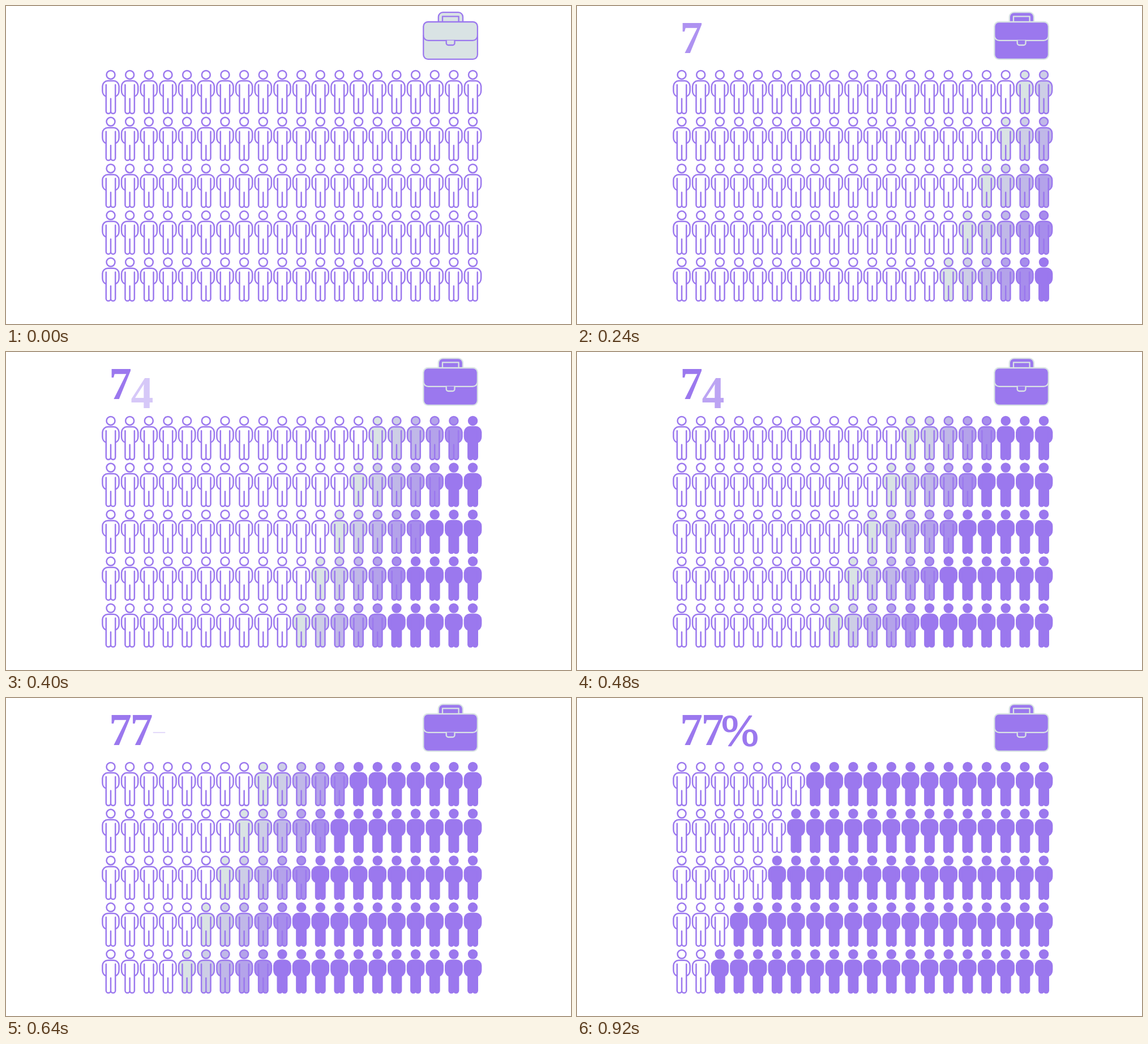
An HTML page that plays this animation: 998x561 px, repeating every 1000 ms.

```html
<!DOCTYPE html>
<html lang="en">
<head>
<meta charset="utf-8">
<title>77%</title>
<style>
  html, body { margin: 0; width: 100%; height: 100%; overflow: hidden; background: #fff; }
  svg { display: block; width: 100%; height: 100%; }
  text { font: bold 80px "Liberation Serif", "Times New Roman", serif; fill: #9b78ee; }
  .percent { font-weight: normal; font-size: 79px; stroke: #9b78ee; stroke-width: 1.6px; }
  .dash { font-weight: normal; font-size: 42px; }
</style>
</head>
<body>
<svg id="stage" viewBox="0 0 998 561" fill="none" stroke-linecap="round" stroke-linejoin="round">
  <defs>
    <g id="person" stroke="#9b78ee" stroke-width="2.5">
      <circle r="7.5"/>
      <path d="M-8.4 38C-12 37-14.6 33-14.6 28V20A9.5 9.5 0 0 1-5.1 10.7H5.1A9.5 9.5 0 0 1 14.6 20V28C14.6 33 12 37 8.4 38"/>
      <path d="M-8.2 17.5V64.2A4.1 4.1 0 0 0 0 64.2V42V64.2A4.1 4.1 0 0 0 8.2 64.2V17.5"/>
    </g>
  </defs>
  <g id="bag" stroke-width="2.3">
    <path d="M763.8 28V19A8 8 0 0 1 771.8 11.2H799A8 8 0 0 1 807 19V28"/>
    <path d="M771 28V18.3H799.6V28"/>
    <rect x="737.3" y="28" width="95.6" height="65.8" rx="8"/>
    <path d="M737.3 52A8.5 8.5 0 0 0 745.8 60.8H824.4A8.5 8.5 0 0 0 832.9 52"/>
    <path d="M777.7 60.8V65.5A3.5 3.5 0 0 0 781.2 69H789A3.5 3.5 0 0 0 792.5 65.5V60.8"/>
  </g>
  <g id="crowd"></g>
  <g id="label"><text/><text/><text/></g>
</svg>
<script>
const STEP = 40, LOOP = 1000, LAST = 23, COLS = 20;
const pale = [217, 227, 228], violet = [155, 120, 238];
const emptyPerRow = [7, 6, 5, 3, 2];
const clamp = (v, lo, hi) => Math.min(hi, Math.max(lo, v));
const mix = k => `rgb(${pale.map((p, i) => Math.round(p + (violet[i] - p) * k))})`;

const bag = document.getElementById("bag");
const crowd = document.getElementById("crowd");
const slots = [...document.getElementById("label").children];

const people = [];
emptyPerRow.forEach((empty, row) => {
  for (let col = 0; col < COLS; col++) {
    const el = document.createElementNS("http://www.w3.org/2000/svg", "use");
    el.setAttribute("href", "#person");
    el.setAttribute("x", 185 + col * 33.66);
    el.setAttribute("y", 121.4 + row * 82.65);
    crowd.append(el);
    people.push({ el, delay: col < empty ? Infinity : COLS - 1 - col + 4 - row });
  }
});

// Each slot runs through its glyphs: [end of its turn in ms, glyph, x, baseline, class]
const glyphs = [
  [[240, "6", 183, 83.3], [Infinity, "7", 182, 83.3]],
  [[240, "4", 220.5, 98.6], [320, "9", 220, 99], [Infinity, "7", 219.5, 83.3]],
  [[240, "–", 260, 70.5, "dash"], [Infinity, "%", 255, 83, "percent"]]
];

function drawSlot(el, i, time) {
  const age = time - i * 280;
  const [, char, x, y, cls = ""] = glyphs[i].find(g => age < g[0]);
  el.textContent = char;
  el.setAttribute("x", x);
  el.setAttribute("y", y);
  el.setAttribute("class", cls);
  el.setAttribute("opacity", clamp(age / 300, 0, 1));
}

function draw(now) {
  const n = Math.min(LAST, Math.floor(now % LOOP / STEP));
  for (const { el, delay } of people) {
    const level = n - delay;
    el.setAttribute("fill", level < 1 ? "#fff" : mix(clamp((level - 1) / 5, 0, 1)));
  }
  const k = clamp(n / 5, 0, 1);
  bag.setAttribute("fill", mix(k));
  bag.setAttribute("stroke", mix(1 - k));
  slots.forEach((el, i) => drawSlot(el, i, n * STEP));
}

const start = performance.now();
function tick() {
  draw(performance.now() - start);
  requestAnimationFrame(tick);
}
tick();
</script>
</body>
</html>
```
